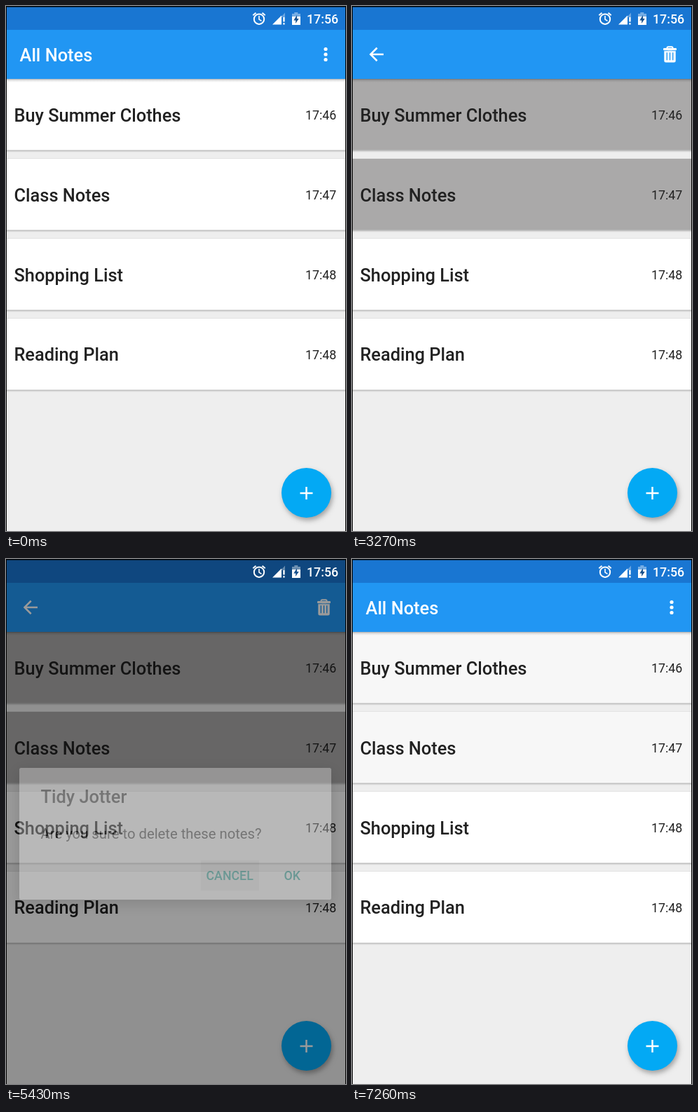
Recreate the animation shown at these times as an HTML page with a canvas. Size 485 by 749 pixels, loop 7.35 s.

```html
<!DOCTYPE html>
<html lang="en">
<head>
<meta charset="utf-8">
<title>Notes</title>
<style>
  html, body { margin: 0; width: 100%; height: 100%; overflow: hidden; background: #000; }
  canvas { display: block; }
</style>
</head>
<body>
<canvas id="stage" width="485" height="749"></canvas>
<script>
const W = 485, H = 749, LOOP = 7350, DP = 1.268;
const FONT = 'Roboto, sans-serif';
const ctx = document.getElementById('stage').getContext('2d');
const layer = document.createElement('canvas');
layer.width = W;
layer.height = H;
const dlg = layer.getContext('2d');

const NOTES = [
  ['Buy Summer Clothes', '17:46'],
  ['Class Notes', '17:47'],
  ['Shopping List', '17:48'],
  ['Reading Plan', '17:48']
];
const DIALOG = { x: 19, y: 298, w: 445, h: 188 };
const ARROW = new Path2D('M20 11H7.83l5.59-5.59L12 4l-8 8 8 8 1.41-1.41L7.83 13H20z');

const clamp = v => Math.max(0, Math.min(1, v));
const ramp = (t, from, to) => clamp((t - from) / (to - from));
const between = (t, from, to) => t >= from && t < to;
const lerp = (a, b, u) => a + (b - a) * u;

function rect(c, color, x, y, w, h) {
  c.fillStyle = color;
  c.fillRect(x, y, w, h);
}

function circle(c, color, x, y, r) {
  c.fillStyle = color;
  c.beginPath();
  c.arc(x, y, r, 0, Math.PI * 2);
  c.fill();
}

function polygon(c, color, points) {
  c.fillStyle = color;
  c.beginPath();
  points.forEach(([x, y]) => c.lineTo(x, y));
  c.closePath();
  c.fill();
}

function line(c, color, width, points) {
  c.strokeStyle = color;
  c.lineWidth = width;
  c.beginPath();
  points.forEach(([x, y], i) => i ? c.lineTo(x, y) : c.moveTo(x, y));
  c.stroke();
}

function text(c, str, x, y, size, color, weight = 500) {
  c.font = `${weight} ${size}px ${FONT}`;
  c.fillStyle = color;
  c.fillText(str, x, y);
}

function clipped(c, x, y, w, h, draw) {
  c.save();
  c.beginPath();
  c.rect(x, y, w, h);
  c.clip();
  draw();
  c.restore();
}

// Touch ripple of each card: long press on the first, tap on the second.
function cardRipple(i, t) {
  if (i === 0 && between(t, 1590, 2220)) {
    const grow = ramp(t, 1590, 2040);
    return { x: 230, r: lerp(5, 260, grow * grow), alpha: 0.055 * (1 - ramp(t, 2040, 2220)) };
  }
  if (i === 1 && between(t, 2670, 3270)) {
    const grow = ramp(t, 2880, 3120);
    return { x: 230, r: lerp(5.2, 260, grow), alpha: 0.045 * (1 - ramp(t, 2910, 3270)) };
  }
  return null;
}

function cardColor(i, t) {
  if (i > 1) return '#fff';
  const [touched, selected] = i ? [2670, 2910] : [1590, 2040];
  if (t < touched) return '#fff';
  return between(t, selected, 6210) ? '#aaa9a9' : '#f7f7f7';
}

function drawCard(i, t) {
  const top = 104 + 114 * i, bottom = top + 102;
  const [title, time] = NOTES[i];
  rect(ctx, '#e3e3e3', 1, top - 1, 483, 1);
  rect(ctx, cardColor(i, t), 1, top, 483, 102);
  const ripple = cardRipple(i, t);
  if (ripple) {
    clipped(ctx, 1, top, 483, 102, () =>
      circle(ctx, `rgba(0,0,0,${ripple.alpha})`, ripple.x, top + 50, ripple.r));
  }
  rect(ctx, '#c2c2c2', 1, bottom - 0.5, 483, 1.5);
  rect(ctx, '#d9d9d9', 1, bottom + 1, 483, 1);
  rect(ctx, '#e8e8e8', 1, bottom + 2, 483, 1);
  text(ctx, title, 11.5, 165 + 113.8 * i, 20 * DP, '#212121');
  text(ctx, time, 427, 162.2 + 113.8 * i, 14 * DP, '#212121', 400);
}

function drawTrash() {
  const white = '#fff';
  ctx.fillStyle = white;
  ctx.beginPath();
  ctx.roundRect(444, 60, 19, 3.2, 1.2);
  ctx.fill();
  ctx.strokeStyle = white;
  ctx.lineWidth = 2;
  ctx.beginPath();
  ctx.roundRect(449.5, 58.2, 8, 4, 1.5);
  ctx.stroke();
  ctx.fillStyle = white;
  ctx.beginPath();
  ctx.roundRect(445.3, 64.3, 16.4, 16.2, [0, 0, 2.5, 2.5]);
  ctx.fill();
  [449.3, 453.5, 457.7].forEach(x => rect(ctx, '#2196f3', x - 0.7, 66.3, 1.4, 11));
}

function drawToolbar(t) {
  rect(ctx, '#2196f3', 1, 34, 483, 70);
  const shadow = ctx.createLinearGradient(0, 104, 0, 109);
  shadow.addColorStop(0, 'rgba(0,0,0,.3)');
  shadow.addColorStop(0.4, 'rgba(0,0,0,.1)');
  shadow.addColorStop(1, 'rgba(0,0,0,0)');
  rect(ctx, shadow, 1, 104, 483, 5);

  clipped(ctx, 1, 34, 483, 70, () => {
    if (between(t, 3900, 4320)) {
      const u = ramp(t, 4080, 4200);
      const alpha = lerp(0.14, 0.04, u) * (1 - ramp(t, 4230, 4320));
      circle(ctx, `rgba(255,255,255,${alpha})`, lerp(463, 453, u), lerp(64, 69, u), lerp(2.3, 42, u));
    }
    if (between(t, 6210, 6540)) {
      circle(ctx, `rgba(255,255,255,${0.03 * (1 - ramp(t, 6240, 6540))})`, 34, 69, 45);
    }
  });

  const actions = ramp(t, 2040, 2220) - ramp(t, 6225, 6420);
  ctx.save();
  ctx.globalAlpha = 1 - actions;
  text(ctx, 'All Notes', 19.5, 79, 20 * DP, '#fff');
  [61.5, 69, 76.5].forEach(y => circle(ctx, '#fff', 456, y, 2.6));
  ctx.globalAlpha = actions;
  if (actions > 0) {
    drawTrash();
    ctx.translate(19.6, 53.8);
    ctx.scale(DP, DP);
    ctx.fillStyle = '#fff';
    ctx.fill(ARROW);
  }
  ctx.restore();
}

function drawFab() {
  ctx.save();
  ctx.shadowColor = 'rgba(0,0,0,.32)';
  ctx.shadowBlur = 7;
  ctx.shadowOffsetX = 2;
  ctx.shadowOffsetY = 4;
  circle(ctx, '#03a9f4', 428.5, 694.5, 35.5);
  ctx.restore();
  line(ctx, '#fff', 2.5, [[419.5, 695], [437.5, 695]]);
  line(ctx, '#fff', 2.5, [[428.5, 686], [428.5, 704]]);
}

function drawStatusIcons() {
  const white = '#fff';
  ctx.strokeStyle = white;
  ctx.lineWidth = 2;
  ctx.beginPath();
  ctx.arc(361, 18.7, 7.2, 0, Math.PI * 2);
  ctx.stroke();
  line(ctx, white, 2, [[352.3, 13.2], [356.5, 9.7]]);
  line(ctx, white, 2, [[365.5, 9.7], [369.7, 13.2]]);
  line(ctx, white, 1.6, [[361, 14], [361, 19], [364.5, 21.3]]);

  polygon(ctx, 'rgba(255,255,255,.35)', [[398, 9.5], [398, 16], [392, 16]]);
  polygon(ctx, white, [[380, 26.5], [393, 13.5], [393, 26.5]]);
  rect(ctx, white, 395.3, 16, 2.3, 6.5);
  rect(ctx, white, 395.3, 24.2, 2.3, 2.3);

  rect(ctx, 'rgba(255,255,255,.4)', 411.3, 9, 5, 2);
  rect(ctx, 'rgba(255,255,255,.4)', 408, 11, 12, 4);
  rect(ctx, white, 408, 15, 12, 12);
  polygon(ctx, '#17508c', [[415, 13], [410.3, 20.5], [413.3, 20.5], [413, 25], [417.7, 18], [415, 18]]);

  text(ctx, '17:56', 429, 25, 14 * DP, white);
}

function drawDialog(t, alpha) {
  const { x, y, w, h } = DIALOG;
  dlg.clearRect(0, 0, W, H);
  dlg.save();
  dlg.shadowColor = 'rgba(0,0,0,.45)';
  dlg.shadowBlur = 20;
  dlg.shadowOffsetY = 6;
  dlg.fillStyle = '#fff';
  dlg.beginPath();
  dlg.roundRect(x, y, w, h, 2.5);
  dlg.fill();
  dlg.restore();

  if (t >= 5280) {
    const u = ramp(t, 5280, 5400);
    clipped(dlg, 278, 430, 83, 43, () =>
      circle(dlg, 'rgba(0,0,0,.07)', 319, 451, lerp(6, 50, u)));
  }
  text(dlg, 'Tidy Jotter', 49.5, 348, 20 * DP, '#212121');
  text(dlg, 'Are you sure to delete these notes?', 49.5, 399.2, 16 * DP, '#212121', 400);
  text(dlg, 'CANCEL', 285.5, 458, 14 * DP, '#009688');
  text(dlg, 'OK', 396.5, 458, 14 * DP, '#009688');

  ctx.globalAlpha = alpha;
  ctx.drawImage(layer, 0, 0);
  ctx.globalAlpha = 1;
}

function draw(t) {
  rect(ctx, '#eee', 0, 0, W, H);
  NOTES.forEach((note, i) => drawCard(i, t));
  rect(ctx, '#1976d2', 1, 1, 483, 33);
  drawToolbar(t);
  drawFab();

  const dim = 0.6 * (ramp(t, 4206, 4320) - ramp(t, 5370, 5550));
  if (dim > 0) rect(ctx, `rgba(0,0,0,${dim})`, 0, 0, W, H);
  drawStatusIcons();

  if (between(t, 4194, 5550)) {
    const shown = 1 - (1 - ramp(t, 4194, 4320)) ** 2.5;
    const left = (1 - ramp(t, 5370, 5520)) ** 2.3;
    drawDialog(t, shown * left);
  }

  rect(ctx, '#000', 0, 0, W, 1);
  rect(ctx, 'rgba(0,0,0,.5)', 0, 1, W, 1);
  rect(ctx, '#000', 0, 0, 1, H);
  rect(ctx, '#000', W - 1, 0, 1, H);
}

const start = performance.now();
function tick() {
  draw((performance.now() - start) % LOOP);
  requestAnimationFrame(tick);
}
tick();
</script>
</body>
</html>
```
